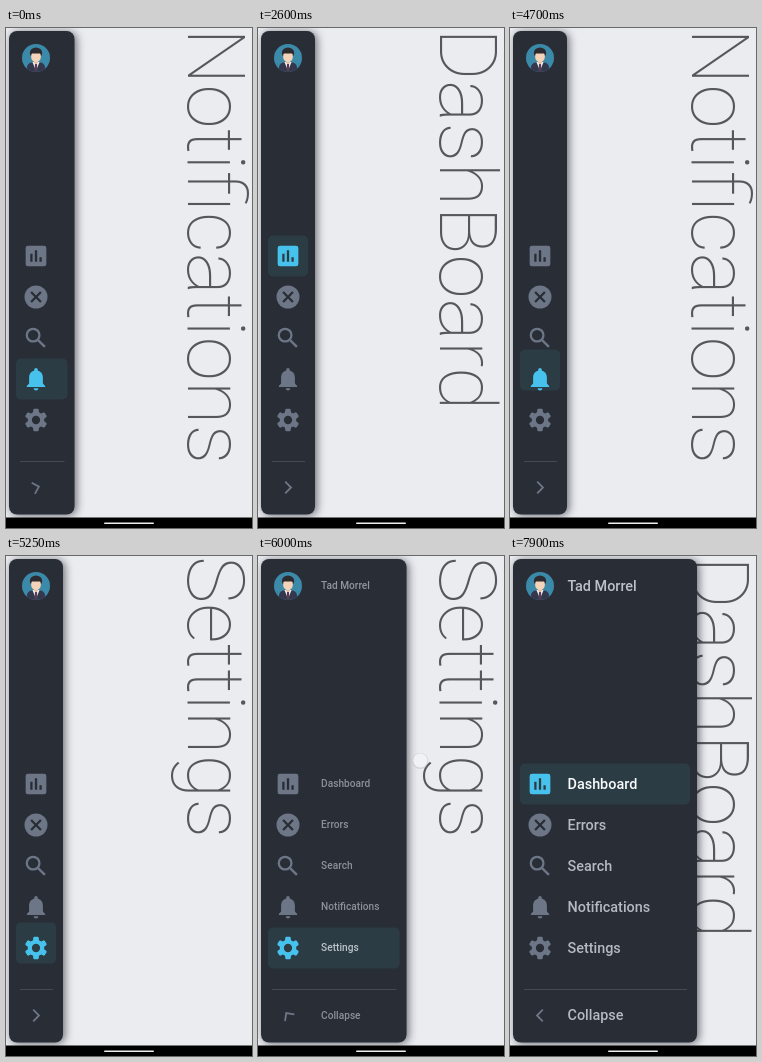
These frames come from a looping animation (246x500 px, 8 s). An HTML page with a canvas:

```html
<!DOCTYPE html>
<html lang="en">
<head>
<meta charset="utf-8">
<title>Sidebar</title>
<style>
html, body { margin: 0; width: 100%; height: 100%; overflow: hidden; background: #ebecf0; }
canvas { display: block; width: 246px; height: 500px; }
</style>
</head>
<body>
<canvas id="stage"></canvas>
<script>
const W = 246, H = 500, LOOP = 8000;
const canvas = document.getElementById('stage');
const ratio = window.devicePixelRatio || 1;
canvas.width = W * ratio;
canvas.height = H * ratio;
const ctx = canvas.getContext('2d');

const PANEL = '#292d36';
const GREY = [108, 118, 134], CYAN = [70, 194, 236];
const DIM = [181, 186, 194], WHITE = [250, 251, 252];
const ICON_X = 30, FIRST_Y = 228, ROW = 41;
const NARROW = 57, WIDE = 187, SLIDE = 600;

const items = [
  { label: 'Dashboard', title: 'DashBoard', icon: chartIcon },
  { label: 'Errors', title: 'Errors', icon: errorIcon },
  { label: 'Search', title: 'Search', icon: searchIcon },
  { label: 'Notifications', title: 'Notifications', icon: bellIcon },
  { label: 'Settings', title: 'Settings', icon: gearIcon }
];

// Each tap selects an item at a given time.
const taps = [
  { at: -2000, item: 3 },
  { at: 50, item: 1 },
  { at: 2000, item: 0 },
  { at: 3520, item: 2 },
  { at: 4400, item: 3 },
  { at: 4890, item: 4 },
  { at: 7040, item: 0 }
];

const bell = new Path2D('M12 22c1.1 0 2-.9 2-2h-4c0 1.1.9 2 2 2zm6-6v-5c0-3.07-1.64-5.64-4.5-6.32V4' +
  'c0-.83-.67-1.5-1.5-1.5s-1.5.67-1.5 1.5v.68C7.63 5.36 6 7.92 6 11v5l-2 2v1h16v-1l-2-2z');

const clamp = v => Math.max(0, Math.min(1, v));
const lerp = (a, b, u) => a + (b - a) * u;
const mix = (a, b, u) => `rgb(${a.map((v, i) => Math.round(lerp(v, b[i], u))).join(',')})`;

// Cubic Bézier easing (0.4, 0, 0.2, 1), solved by bisection.
function ease(u) {
  u = clamp(u);
  if (u === 0 || u === 1) return u;
  let lo = 0, hi = 1, s = 0.5;
  for (let i = 0; i < 20; i++) {
    s = (lo + hi) / 2;
    const r = 1 - s;
    if (1.2 * r * r * s + 0.6 * r * s * s + s * s * s < u) lo = s; else hi = s;
  }
  return 3 * (1 - s) * s * s + s * s * s;
}

function at(x, y, draw, scale = 1, angle = 0) {
  ctx.save();
  ctx.translate(x, y);
  ctx.rotate(angle);
  ctx.scale(scale, scale);
  draw();
  ctx.restore();
}

function box(x, y, w, h, r, fill) {
  ctx.fillStyle = fill;
  ctx.beginPath();
  ctx.roundRect(x, y, w, h, r);
  ctx.fill();
}

function disc(x, y, r, fill) {
  ctx.fillStyle = fill;
  ctx.beginPath();
  ctx.arc(x, y, r, 0, Math.PI * 2);
  ctx.fill();
}

function line(points, color, width) {
  ctx.strokeStyle = color;
  ctx.lineWidth = width;
  ctx.beginPath();
  points.forEach(([x, y]) => ctx.lineTo(x, y));
  ctx.stroke();
}

function shape(points, fill) {
  ctx.fillStyle = fill;
  ctx.beginPath();
  points.forEach(([x, y]) => ctx.lineTo(x, y));
  ctx.closePath();
  ctx.fill();
}

// Icons are drawn in a 24-unit square around the origin.
function chartIcon(color, hole) {
  box(-9, -9, 18, 18, 2, color);
  box(-5, -2, 2, 7, 0, hole);
  box(-1, -5, 2, 10, 0, hole);
  box(3, 1, 2, 4, 0, hole);
}

function errorIcon(color, hole) {
  disc(0, 0, 10, color);
  line([[-4.3, -4.3], [4.3, 4.3]], hole, 2);
  line([[4.3, -4.3], [-4.3, 4.3]], hole, 2);
}

function searchIcon(color) {
  ctx.strokeStyle = color;
  ctx.lineWidth = 2;
  ctx.beginPath();
  ctx.arc(-2.5, -2.5, 5.5, 0, Math.PI * 2);
  ctx.stroke();
  line([[1.6, 1.6], [7.75, 7.75]], color, 2.1);
}

function bellIcon(color) {
  ctx.translate(-12, -12);
  ctx.fillStyle = color;
  ctx.fill(bell);
}

function gearIcon(color, hole) {
  const points = [];
  for (let i = 0; i < 6; i++) {
    const a = (i * 60 + 30) * Math.PI / 180;
    for (const [r, d] of [[7.2, -0.36], [9.5, -0.34], [9.9, -0.2], [9.9, 0.2], [9.5, 0.34], [7.2, 0.36]]) {
      // Outer corners keep the teeth narrower than the gaps at the root.
      const spread = r > 8 ? 0.75 : 1;
      points.push([r * Math.cos(a + d * spread), r * Math.sin(a + d * spread)]);
    }
  }
  shape(points, color);
  disc(0, 0, 3.6, hole);
}

function avatar() {
  ctx.beginPath();
  ctx.arc(0, 0, 14, 0, Math.PI * 2);
  ctx.clip();
  ctx.fillStyle = '#3c8aa9';
  ctx.fillRect(-14, -14, 28, 28);
  box(-9, 4.5, 18, 14, 5, '#34384f');
  shape([[-3.5, 4], [3.5, 4], [0, 13]], '#f2f3f5');
  shape([[-1, 6], [1, 6], [1.3, 12], [0, 14], [-1.3, 12]], '#5b3c50');
  box(-2, 1, 4, 5, 2, '#e3b899');
  ctx.fillStyle = '#2c2b31';
  ctx.beginPath();
  ctx.ellipse(0, -5, 6.2, 5.5, 0, 0, Math.PI * 2);
  ctx.fill();
  ctx.fillStyle = '#f4d3b8';
  ctx.beginPath();
  ctx.ellipse(0, -1.5, 4.9, 5.8, 0, 0, Math.PI * 2);
  ctx.fill();
  box(-5, -8, 10, 3.4, 1.5, '#2c2b31');
}

function label(text, y, open, color) {
  if (open < 0.12) return;
  ctx.globalAlpha = open;
  at(57.5 + 19 * (1 - open), y, () => {
    ctx.font = '500 14.4px Roboto, sans-serif';
    ctx.textBaseline = 'alphabetic';
    ctx.fillStyle = color;
    ctx.fillText(text, 0, 5);
  }, open);
  ctx.globalAlpha = 1;
}

function openness(t) {
  return t < 3000 ? 1 - ease((t + 500) / 770) : ease((t - 5650) / 780);
}

function selection(t) {
  let row = taps[0].item, title = row;
  const weights = items.map((_, i) => i === row ? 1 : 0);
  for (const tap of taps.slice(1)) {
    if (t < tap.at) break;
    const u = ease((t - tap.at) / SLIDE);
    row = lerp(row, tap.item, u);
    title = tap.item;
    weights.forEach((w, i) => { weights[i] = lerp(w, i === tap.item ? 1 : 0, clamp(u * 1.5)); });
  }
  return { row, title, weights };
}

function drawTouch(t) {
  if (t < 5700 || t > 6200) return;
  const x = t < 6000 ? lerp(60, 162, (t - 5700) / 300) : lerp(162, 220, (t - 6000) / 200);
  ctx.globalAlpha = clamp((t - 5700) / 60) * clamp((6200 - t) / 120);
  disc(x, 205, 8, 'rgba(195,197,202,.55)');
  disc(x, 204.5, 7, 'rgba(246,247,249,.85)');
  ctx.globalAlpha = 1;
}

function draw(t) {
  const open = openness(t);
  const right = lerp(NARROW, WIDE, open);
  const { row, title, weights } = selection(t);

  ctx.setTransform(ratio, 0, 0, ratio, 0, 0);
  ctx.fillStyle = '#ebecf0';
  ctx.fillRect(0, 0, W, H);

  at(182, 0, () => {
    ctx.font = '100 80px Roboto, sans-serif';
    ctx.textBaseline = 'alphabetic';
    ctx.fillStyle = '#55575b';
    ctx.fillText(items[title].title, 0, 0);
  }, 1, Math.PI / 2);

  ctx.save();
  ctx.shadowColor = 'rgba(20,24,34,.6)';
  ctx.shadowBlur = 9 * ratio;
  ctx.shadowOffsetX = 2 * ratio;
  ctx.shadowOffsetY = ratio;
  box(3, 3, right - 3, 483.5, 8, PANEL);
  ctx.restore();

  ctx.save();
  ctx.beginPath();
  ctx.roundRect(3, 3, right - 3, 483.5, 8);
  ctx.clip();

  at(ICON_X, 30, avatar);
  label('Tad Morrel', 29.5, open, mix(DIM, WHITE, 0.1));

  box(10, FIRST_Y - 20.5 + row * ROW, right - 17, 41, 5, '#2c3c45');

  items.forEach((item, i) => {
    const y = FIRST_Y + i * ROW;
    const hole = mix([41, 45, 54], [44, 60, 69], weights[i]);
    at(ICON_X, y, () => item.icon(mix(GREY, CYAN, weights[i]), hole), 1.15);
    label(item.label, y - 0.5, open, mix(DIM, WHITE, weights[i]));
  });

  ctx.fillStyle = '#434851';
  ctx.fillRect(14, 433, right - 24, 1);
  at(ICON_X, 459.5, () => line([[-2.8, -5.8], [3, 0], [-2.8, 5.8]], mix(GREY, CYAN, 0), 1.8), 1, -Math.PI * open);
  label('Collapse', 459, open, mix(DIM, WHITE, 0));
  ctx.restore();

  drawTouch(t);

  ctx.fillStyle = '#000';
  ctx.fillRect(0, 489.5, W, 11);
  box(98, 494.5, 50, 1.6, 0.8, '#eee');
}

const start = performance.now();
function tick() {
  draw((performance.now() - start) % LOOP);
  requestAnimationFrame(tick);
}
tick();
</script>
</body>
</html>
```
